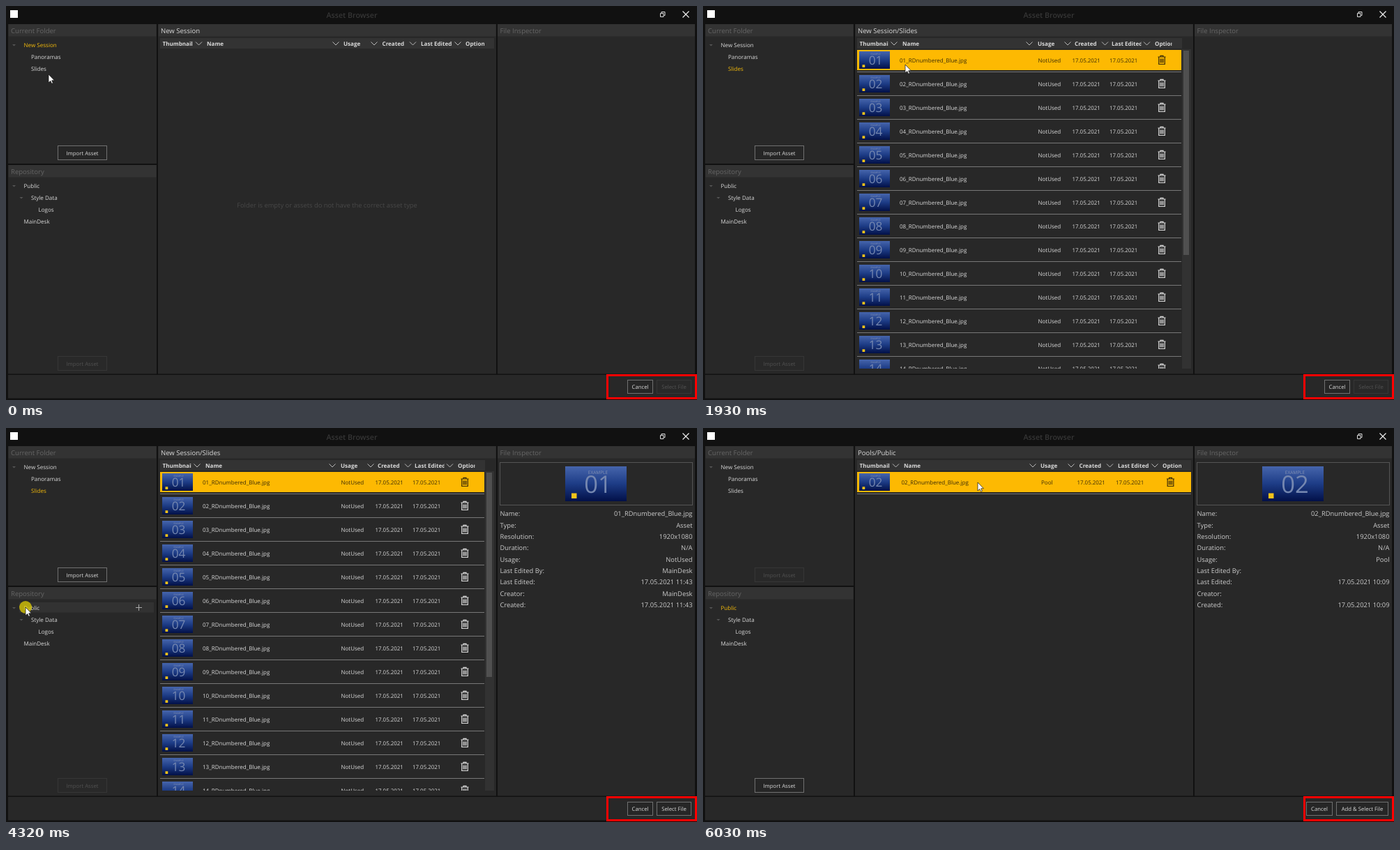
These frames come from a looping animation (991 by 565 pixels, 7150 ms). An HTML page:

```html
<!DOCTYPE html>
<html lang="en">
<head>
<meta charset="utf-8">
<title>Asset Browser</title>
<style>
html, body { margin: 0; width: 100%; height: 100%; overflow: hidden; background: #111; }
svg { display: block; }
text { font-family: "Open Sans", "Noto Sans", sans-serif; white-space: pre; text-rendering: geometricPrecision; }
</style>
</head>
<body>
<svg id="stage" width="991" height="565" viewBox="0 0 991 565">
  <defs>
    <linearGradient id="blue" x2="0" y2="1">
      <stop offset="0" stop-color="#4665ac"/><stop offset=".5" stop-color="#1d3c86"/><stop offset="1" stop-color="#021048"/>
    </linearGradient>
    <clipPath id="list"><rect x="219" y="62" width="484" height="458"/></clipPath>
  </defs>
  <g id="view"></g>
  <circle id="click" r="9" fill="#e6d200" opacity=".72"/>
  <path id="cursor" d="M0 0V12L2.8 9.5L4.6 13.3L6.4 12.5L4.7 8.8H8.4Z" fill="#fff" stroke="#111" stroke-width=".7"/>
</svg>
<script>
const LOOP = 7150;
const YELLOW = '#f5bb0a', LIGHT = '#dadada', DIM = '#666', FAINT = '#484848';
const $ = id => document.getElementById(id);

const rect = (x, y, w, h, fill, more = '') =>
  `<rect x="${x}" y="${y}" width="${w}" height="${h}" fill="${fill}" ${more}/>`;
const text = (x, y, str, size = 8.05, fill = LIGHT, more = '') =>
  `<text x="${x}" y="${y}" font-size="${size}" fill="${fill}" ${more}>${str}</text>`;
const line = (d, color, width = 1) =>
  `<path d="${d}" fill="none" stroke="${color}" stroke-width="${width}"/>`;
const mid = 'text-anchor="middle"', end = 'text-anchor="end"';

const panel = (x, y, w, h) => rect(x, y, w, h, '#282828');
const header = (x, y, w, str, color = DIM) =>
  rect(x, y, w, 17.5, '#333') + text(x + 3.5, y + 12.8, str, 9.55, color);
const button = (x, y, w, h, str, on) =>
  rect(x + .5, y + .5, w - 1, h - 1, on ? '#262626' : '#292929', `stroke="${on ? '#707070' : '#363636'}"`) +
  text(x + w / 2, y + h / 2 + 3.4, str, 7.75, on ? LIGHT : '#525252', mid);
const twisty = (x, y) => `<path d="M${x - 2.5} ${y - 1}h5l-2.5 2.5z" fill="#555"/>`;
const plus = (x, y) => line(`M${x - 4.5} ${y}h9M${x} ${y - 4.5}v9`, '#aaa');
const trash = (x, y, color, scale = 1) => `<g transform="translate(${x} ${y}) scale(${scale})">` +
  line('M-5.5 -4.5H5.5M-2 -4.5V-6.2H2V-4.5M-4.3 -4V6H4.3V-4M-2 -2V4M0 -2V4M2 -2V4', color, 1.2) + '</g>';

// Slide picture, drawn at 88 x 50 and scaled
function slide(x, y, scale, num) {
  return `<g transform="translate(${x} ${y}) scale(${scale})">` + rect(0, 0, 88, 50, 'url(#blue)') +
    text(47, 10.5, 'EXAMPLE', 6.5, '#8492b4', mid) +
    text(47, 38, num, 34.5, '#7587b0', mid) + rect(9, 38.5, 7.5, 7.5, '#f3c21a') + '</g>';
}

function columns(wide) {
  const cols = wide
    ? [['Thumbnail', 224.5, 276.5], ['Name', 288, 473], ['Usage', 484, 528], ['Created', 539.5, 583.5], ['Last Edited', 595, 648], ['Options', 659, 690]]
    : [['Thumbnail', 224.5, 274], ['Name', 286, 468], ['Usage', 480, 523], ['Created', 533, 576.5], ['Last Edited', 586, 636.5], ['Options', 648, 676.5]];
  return rect(221, 46, wide ? 479 : 466, 15, '#333') + cols.map(([name, x, arrow], i) =>
    `<svg x="${x}" y="46" width="${arrow - x - (i == 5 ? 4 : 8)}" height="15">` +
    text(0, 10.8, name, 8.05, LIGHT, 'font-weight="700"') + '</svg>' +
    (i < 5 ? line(`M${arrow - 4.5} 51.5l4.5 4.5l4.5 -4.5`, '#bbb') : '')).join('');
}

function row(i, num, wide, usage, look) {
  const y = 62 + 34 * i, right = wide ? 700 : 686, base = y + 18.9;
  const color = { hover: YELLOW, selected: '#3a2c08' }[look] || LIGHT;
  const [name, use, made, edited, bin] = wide ? [284.5, 485, 536.5, 592, 670.5] : [282, 480.5, 529.5, 583, 658];
  return (look == 'selected' ? rect(221, y + 1, right - 221, 29, '#fdb902') : '') +
    slide(224, y + 3, .5, num) +
    text(name, base, num + '_RDnumbered_Blue.jpg', 8, color) + text(use, base, usage, 8, color) +
    text(made, base, '17.05.2021', 7.9, color) + text(edited, base, '17.05.2021', 7.9, color) +
    trash(bin, y + 15.5, color) + line(`M221 ${y + 32.5}H${right}`, '#777');
}

function inspector(num, usage, user, time) {
  const date = '17.05.2021 ' + time;
  const facts = [['Name', num + '_RDnumbered_Blue.jpg'], ['Type', 'Asset'], ['Resolution', '1920x1080'], ['Duration', 'N/A'],
    ['Usage', usage], ['Last Edited By', user], ['Last Edited', date], ['Creator', user], ['Created', date]];
  return rect(708.5, 49.5, 276, 61, 'none', 'stroke="#555"') + slide(802, 55, 1, num) +
    facts.map(([key, value], i) => text(708.5, 126.4 + 16.3 * i, key + ':', 9.35, '#ccc') +
      text(984.5, 126.4 + 16.3 * i, value, 9.35, '#ccc', end)).join('');
}

function scene(t, x, y) {
  const pool = t >= 4390, slides = t >= 750 && !pool;
  const picked = t >= 5900 || t >= 1860 && !pool;
  const shown = t >= 6030 || t >= 2000 && !pool;
  const overRow = x > 221 && y < 95 && t > 1310;
  const look = picked ? 'selected' : overRow ? 'hover' : '';
  const pick = on => on ? YELLOW : LIGHT;
  let s = rect(0, 0, 991, 565, '#111') + rect(6, 6, 11, 11, '#fff') +
    text(496, 16.5, 'Asset Browser', 10.7, '#363636', mid + ' font-weight="600"') +
    line('M938.5 10.5h4.5v5h-4.5zM940 10V8.5h5V13.5H943.5', '#ddd') + line('M970.5 7.5l9 9m0 -9l-9 9', '#eee', 1.2) +
    panel(3, 26, 213, 200) + panel(3, 228, 213, 299.5) + panel(218, 26, 485, 501.5) +
    panel(705, 26, 283, 501.5) + panel(3, 529, 985, 33.5) +
    header(3.5, 26, 212, 'Current Folder') + header(3.5, 228, 212, 'Repository') + header(705, 26, 283, 'File Inspector') +
    header(218.5, 26, 484, pool ? 'Pools/Public' : slides ? 'New Session/Slides' : 'New Session', LIGHT);

  if (t >= 130 && t < 1400 && x < 212) s += rect(30, 83, 182, 14.5, '#323232') + plus(190.5, 90.5) + trash(203.5, 90, '#aaa', .75);
  if (t >= 3640 && t < 5000 && x < 212) s += rect(19, 250, 193, 14.5, '#323232') + plus(190.5, 257.5);
  s += twisty(11.5, 56) + twisty(11.5, 258) + twisty(22, 275) +
    text(25.5, 58.9, 'New Session', 8.05, pick(t < 470)) + text(36, 75.9, 'Panoramas') +
    text(36, 92.9, 'Slides', 8.05, pick(t >= 470 && !pool)) +
    text(25.5, 260.9, 'Public', 8.05, pick(pool)) + text(36, 277.9, 'Style Data') +
    text(46.5, 294.9, 'Logos') + text(25.5, 311.9, 'MainDesk') +
    button(74, 200, 71, 21, 'Import Asset', !pool) + button(74, 502, 71, 21, 'Import Asset', pool);

  s += columns(!slides);
  if (pool) s += row(0, '02', true, 'Pool', look);
  else if (slides) {
    s += '<g clip-path="url(#list)">';
    for (let i = 0; i < 14; i++) s += row(i, String(i + 1).padStart(2, 0), false, 'NotUsed', i ? '' : look);
    s += '</g>' + rect(687, 62, 13, 458, '#323232') + rect(689, 64, 8, 293, '#505050');
  } else s += text(460.5, 289.3, 'Folder is empty or assets do not have the correct asset type', 9.35, FAINT, mid);

  if (shown) s += pool ? inspector('02', 'Pool', '', '10:09') : inspector('01', 'NotUsed', 'MainDesk', '11:43');
  s += pool && shown
    ? button(865, 536, 38, 20, 'Cancel', true) + button(908, 536, 75, 20, 'Add &amp; Select File', true)
    : button(891, 536, 37, 20, 'Cancel', true) + button(933, 536, 50, 20, 'Select File', shown);
  return s + rect(862.5, 529.5, 127, 33, 'none', 'stroke="#f00" stroke-width="3"');
}

// Pointer stops: time, x, y and the easing used on the way there
const smooth = p => p * p * (3 - 2 * p), out = p => p * (2 - p);
const path = [[70, 61, 98], [200, 58, 90], [1020, 58, 90], [1300, 238, 92], [1720, 290, 84, out], [2870, 290, 84],
  [3360, 147, 204], [3570, 72, 243], [3640, 72, 243], [3920, 28, 257, out], [4740, 28, 257], [5430, 389, 82, smooth], [5570, 394, 78]];
function pointer(t) {
  const i = path.findIndex(stop => stop[0] > t);
  if (i < 1) return path.at(i).slice(1, 3);
  const [t0, x0, y0] = path[i - 1], [t1, x1, y1, ease = p => p] = path[i];
  const p = ease((t - t0) / (t1 - t0));
  return [x0 + (x1 - x0) * p, y0 + (y1 - y0) * p];
}
const clicks = [[400, 540], [1790, 1930], [4320, 4460], [5900, 6030]];

let last, start = performance.now();
function frame() {
  const t = (performance.now() - start) % LOOP;
  const [x, y] = pointer(t), html = scene(t, x, y);
  if (html !== last) $('view').innerHTML = last = html;
  const place = `translate(${x.toFixed(1)} ${y.toFixed(1)})`;
  $('cursor').setAttribute('transform', place);
  $('click').setAttribute('transform', place);
  $('click').style.display = clicks.some(([a, b]) => t >= a && t < b) ? '' : 'none';
  requestAnimationFrame(frame);
}
frame();
</script>
</body>
</html>
```
